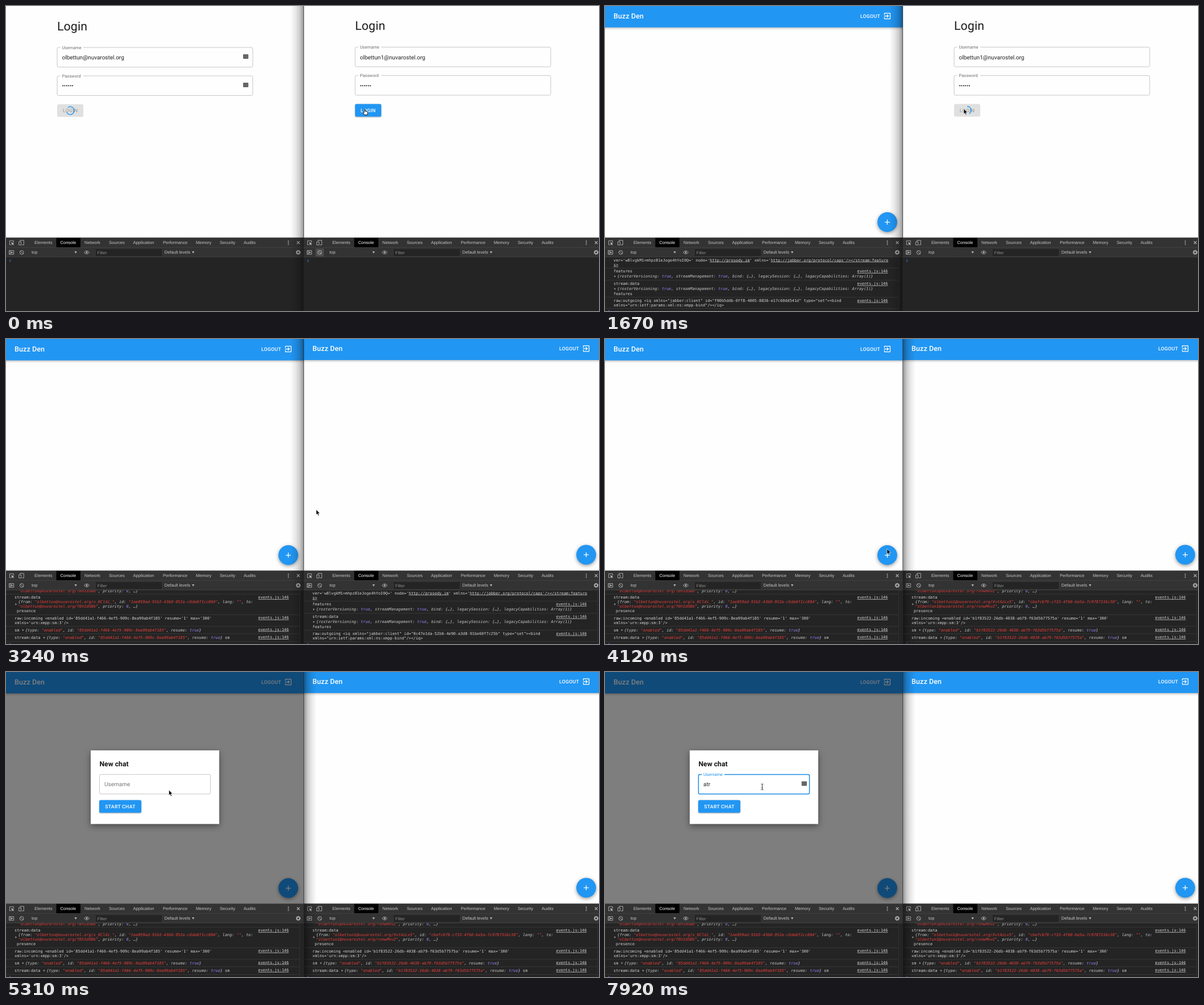
Animation of 1043x537 px, one loop 8 s. Source, as an HTML page:

```html
<!DOCTYPE html>
<html lang="en">
<head>
<meta charset="utf-8">
<title>Two chat clients</title>
<style>
html, body { margin: 0; width: 100%; height: 100%; overflow: hidden; background: #fefefe; }
svg { display: block; width: 1043px; height: 537px; text-rendering: geometricPrecision; }
text { white-space: pre; font-family: Roboto, sans-serif; }
.ui { font-family: "Liberation Sans", Arial, sans-serif; font-size: 7.55px; }
.mono { font-family: "DejaVu Sans Mono", monospace; font-size: 6.875px; fill: #d6d6d6; }
.obj { font-style: italic; fill: #c8c8c8; }
.str { fill: #e93f3b; }
.val { fill: #9980ff; }
.url { text-decoration: underline; }
.btn { font-size: 8.75px; font-weight: 500; letter-spacing: .02857em; }
.low { filter: drop-shadow(0 1px 1px rgba(0,0,0,.35)); }
.bar { filter: drop-shadow(0 1.5px 2px rgba(0,0,0,.35)); }
.fab { filter: drop-shadow(0 2px 3px rgba(0,0,0,.4)); }
.box { filter: drop-shadow(0 4px 6px rgba(0,0,0,.4)); }
.line { fill: none; stroke: #b4b4b4; stroke-width: .9; }
</style>
</head>
<body>
<svg id="stage" viewBox="0 0 1043 537" xmlns="http://www.w3.org/2000/svg"></svg>
<script>
const BLUE = '#2196f3', CHAR = 4.139, LOOP = 8000;
const HOST = 'nuvarostel.org';
const panes = [
  { id: 'L', dx: 0, dy: 0, user: 'olbettun@' + HOST, from: 'x_KCldi_', to: 'T0hId5Bb',
    msg: '1ee059ad-91b3-43b0-952a-c6da6f1cc804', sm: '85dd41a1-f466-4ef5-909c-8ea99ab4f185',
    bind: 'f90b5ddb-0ff8-4005-8836-e17c60dd541d' },
  { id: 'R', dx: 524, dy: -.6, user: 'olbettun1@' + HOST, from: 'XvtAzLx5', to: 'ronwMnvZ',
    msg: 'cbefc679-cf33-4fb0-be5a-7c9787316c38', sm: 'b1f83522-26db-4038-ab79-f63d5b77575a',
    bind: '0c47e1da-52b6-4e90-a3d8-91be60f7c25b' }
];

const esc = s => s.replace(/&/g, '&amp;').replace(/</g, '&lt;').replace(/>/g, '&gt;');
const text = (x, y, s, size, fill, more = '') =>
  `<text x="${x}" y="${y}" font-size="${size}" fill="${fill}" ${more}>${esc(s)}</text>`;
const rect = (x, y, w, h, fill, more = '') =>
  `<rect x="${x}" y="${y}" width="${w}" height="${h}" fill="${fill}" ${more}/>`;
const path = (d, more) => `<path d="${d}" ${more}/>`;
const group = (id, body, more = '') => `<g id="${id}" ${more}>${body}</g>`;
const button = (x, y, w, label, fill, ink, more = '') =>
  rect(x, y, w, 22.3, fill, `rx="2.5" ${more}`) +
  `<text class="btn" x="${x + w / 2}" y="${y + 14.2}" text-anchor="middle" fill="${ink}">${label}</text>`;
const badge = (x, y) => rect(x, y, 9.3, 8, '#666', 'rx="1"');

// Login form and chat page
function field(y, label, value, icon) {
  return rect(90, y, 344, 34.6, 'none', 'rx="2.5" stroke="#c0c0c0" stroke-width=".9"') +
    rect(95.5, y - 1, 40.5, 2, '#fefefe') +
    text(98.5, y + 2.7, label, 7.5, 'rgba(0,0,0,.56)') +
    text(98.5, y + 21.2, value, 10, 'rgba(0,0,0,.87)') +
    (icon ? badge(417, y + 12) : '');
}
function login(p) {
  const icon = p.id === 'L';
  return text(90, 42.5, 'Login', 21.25, 'rgba(0,0,0,.9)', 'letter-spacing=".15"') +
    field(73, 'Username', p.user, icon) + field(123, 'Password', '••••••', icon) +
    group('ready' + p.id, button(90, 173, 46, 'LOGIN', BLUE, '#fff', 'class="low"')) +
    group('busy' + p.id, button(90, 173, 46, 'LOGIN', '#e0e0e0', '#a6a6a6') +
      `<path id="arc${p.id}" fill="none" stroke="${BLUE}" stroke-width="1.4"/>`);
}
function home() {
  return rect(-6, -8, 536, 45.6, BLUE, 'class="bar"') +
    text(15, 22, 'Buzz Den', 12.5, '#fff', 'font-weight="500" letter-spacing=".09"') +
    '<text class="btn" x="449" y="20.6" fill="#fff">LOGOUT</text>' +
    path('M10.09 15.59L11.5 17l5-5-5-5-1.41 1.41L12.67 11H3v2h9.67zM19 3H5c-1.11 0-2 .9-2 2v4h2V5h14v14H5v-4H3v4c0 1.1.89 2 2 2h14c1.1 0 2-.9 2-2V5c0-1.1-.9-2-2-2z',
      'transform="translate(489 10) scale(.625)" fill="#fff"') +
    `<circle class="fab" cx="496.5" cy="380.5" r="17.4" fill="${BLUE}"/>` +
    path('M492.1 380.5h8.8M496.5 376.1v8.8', 'stroke="#fff" stroke-width="1.25"');
}
function modal() {
  const edge = (color, w) => rect(164.4, 180.4, 195.2, 34.4, 'none', `rx="2.5" stroke="${color}" stroke-width="${w}"`);
  return rect(149, 138, 226, 129.6, '#fff', 'class="box"') +
    text(164.5, 166, 'New chat', 12.2, 'rgba(0,0,0,.92)', 'font-weight="700"') +
    group('idle', edge('#c0c0c0', .9) + text(173, 201, 'Username', 10, 'rgba(0,0,0,.54)')) +
    group('focus', edge('#1e8ce3', 1.5) + rect(170.5, 179, 39.5, 3, '#fff') +
      text(173, 183, 'Username', 7.5, BLUE) + badge(345.8, 192.5) +
      text(173, 201, '', 10, 'rgba(0,0,0,.87)', 'id="typed"') + rect(0, 192, .8, 11.5, '#222', 'id="caret"')) +
    button(164, 225.4, 74, 'START CHAT', BLUE, '#fff', 'class="low"');
}

// Developer tools
function tools() {
  const ui = (x, y, s, fill = '#c4c4c4') => `<text class="ui" x="${x}" y="${y}" fill="${fill}">${s}</text>`;
  const tabs = { Elements: 50, Network: 138, Sources: 181, Application: 223.5, Performance: 276, Memory: 334, Security: 376, Audits: 418 };
  const down = (x, y) => path(`M${x} ${y}h4.4l-2.2 3.8z`, 'fill="#b4b4b4"');
  const dot = y => `<circle cx="496.6" cy="${y}" r=".9" fill="#bbb"/>`;
  return rect(0, 408, 524, 34, '#333') + rect(0, 442, 524, 95, '#242424') +
    rect(0, 407.6, 524, .7, '#4a4a4a') + rect(0, 424.7, 524, .7, '#484848') + rect(0, 441.6, 524, .7, '#484848') +
    rect(88.5, 408.2, 42.5, 16.5, '#000') + ui(95.5, 419.2, 'Console', '#fff') +
    Object.entries(tabs).map(([s, x]) => ui(x, 419.2, s)).join('') +
    path('M9 420.3H6.4V413.3H13.4V416', 'class="line"') + path('M9.4 415.8l5 2-2.1.9 1.7 1.8-.8.8-1.8-1.8-1 2z', 'fill="#b4b4b4"') +
    path('M24.8 414.5V412.6H31.3V420.6H28M22.6 415.2h4v5.6h-4z', 'class="line"') +
    dot(414) + dot(416.8) + dot(419.6) +
    path('M511.7 414.2l4.8 4.8m0-4.8l-4.8 4.8', 'class="line" style="stroke-width:1.1"') +
    path('M5.6 430.6h8v6.6h-8zM7.6 430.6v6.6', 'class="line"') + path('M9 432l3.6 1.9-3.6 1.9z', 'fill="#b4b4b4"') +
    path('M24.3 433.9a3.4 3.4 0 1 0 6.8 0a3.4 3.4 0 1 0 -6.8 0M25.4 431.5l4.7 4.8', 'class="line"') +
    ui(45, 436.4, 'top') + down(120.4, 432) +
    path('M137.4 433.8q4.6-5.4 9.2 0q-4.6 5.4-9.2 0z', 'class="line"') + '<circle cx="142" cy="433.8" r="1.5" fill="#b4b4b4"/>' +
    rect(158, 428, 116, 12, '#242424') + ui(160.8, 436.6, 'Filter', '#8c8c8c') +
    ui(278.7, 436.4, 'Default levels') + down(327, 432) +
    '<circle cx="514" cy="433.8" r="2.5" fill="none" stroke="#b4b4b4" stroke-width="1.6"/>' +
    '<circle cx="514" cy="433.8" r="3.7" fill="none" stroke="#b4b4b4" stroke-width="1.1" stroke-dasharray="1.45"/>';
}
const plain = s => esc(s).replace(/\[\[(.*?)\]\]/g, '<tspan class="url">$1</tspan>');
const tint = s => '<tspan class="obj">' + esc(s)
  .replace(/"[^"]*"/g, m => `<i>${m}</i>`)
  .replace(/\b(true|0)\b(?![^<]*<\/i>)/g, '<tspan class="val">$1</tspan>')
  .replace(/<i>/g, '<tspan class="str">').replace(/<\/i>/g, '</tspan>') + '</tspan>';

// "▶" opens an object, "▷" one on two lines, "·" continues it
function row(y, s, x = 15) {
  const write = (x, body) => `<text class="mono" x="${x}" y="${y + 2.3}">${body}</text>`;
  const m = s.match(/^(.*?)([▶▷·])(.*)$/);
  if (!m) return write(x, plain(s));
  const at = x + m[1].length * CHAR, end = m[3].lastIndexOf('}') + 1 || m[3].length;
  const mid = y + (m[2] === '▷' ? 4 : 0);
  return write(x, plain(m[1])) + write(at + 6.5, tint(m[3].slice(0, end)) + plain(m[3].slice(end))) +
    (m[2] === '·' ? '' : path(`M${at + 1.4} ${mid - 1.8}l2.8 1.8-2.8 1.8z`, 'fill="#9a9a9a"'));
}
const rows = list => list.map(r => row(...r)).join('');
const links = list => list.map(y => row(y, '[[events.js:146]]', 443.6)).join('');
const rules = list => list.map(y => rect(0, y, 516, .7, '#3d3d3d')).join('');
const prompt = y => path(`M6 ${y}l2.4 2-2.4 2`, 'fill="none" stroke="#3f86f0" stroke-width="1"');

function logs(p) {
  const features = '▶{rosterVersioning: true, streamManagement: true, bind: {…}, legacySession: {…}, legacyCapabilities: Array(1)}';
  const enabled = `▶{type: "enabled", id: "${p.sm}", resume: true}`;
  const target = `·"${p.user}/${p.to}", priority: 0, …}`;
  const tail = prompt(535.4) + rect(516, 442, .7, 95, '#383838');
  return [
    prompt(446.6),
    rows([
      [450, 'stream:data ▶{type: "challenge", value: Uint8Array(160)} sasl'],
      [462, 'credentials:update'],
      [470.5, '▷{password: "123456", clientKey: Uint8Array(20), salt: Uint8Array(36), saltedPassword: Uint8Array(20), serverKey: Uin'],
      [478.5, '·t8Array(20)}'],
      [490.5, 'raw:outgoing <response xmlns="urn:ietf:params:xml:ns:xmpp-'],
      [498.5, 'sasl">YzIiaXdzLHI9YmQyZTRkYjVhY2I1MTBhODY4ZGI2NjhjNzQzMTk0MWE3YzhhZWQ2NzE1ZDBhNzc0OTUyZDJlYjE2YjllY2I5ZmU3NGIzLTQ'],
      [506.5, 'yNGMtNDAwNS04NWU3LWQxOWQ1ZjAxNWZmZSxwPVZ6a0J6b3lRVlhUOS9PaVZiUVhERkpYRUhiYz0=</response>'],
      [518.5, "raw:incoming <success xmlns='urn:ietf:params:xml:ns:xmpp-"],
      [526.5, "sasl'>dj1ObStJZ0pjY3Q4dkhHQ0pVdU9oTUZIVnBRMVE9</success>"]
    ]) + links([449.5, 462, 490.5, 518.5]) + rules([456, 484.3, 512.3, 532.3]) + tail,
    rows([
      [447.2, "ver='w8lvgkM1+mhpz81eJoge4hYoI0Q=' node='[[http://prosody.im]]' xmlns='[[http://jabber.org/protocol/caps'/></stream:feature]]"],
      [455.3, '[[s>]]'],
      [467, 'features'], [476, features],
      [489, 'stream:data'], [498, features], [507, 'features'],
      [518.5, `raw:outgoing <iq xmlns="jabber:client" id="${p.bind}" type="set"><bind`],
      [526.5, 'xmlns="urn:ietf:params:xml:ns:xmpp-bind"/></iq>']
    ]) + links([467, 489, 518.5]) + rules([461, 482.6, 512.5, 532.3]) + tail,
    rows([
      [443.2, target],
      [455, 'stream:data'],
      [463, `▷{from: "${p.user}/${p.from}", id: "${p.msg}", lang: "", to:`],
      [471, target],
      [479, 'presence', 19.1],
      [491.5, `raw:incoming <enabled id='${p.sm}' resume='1' max='300'`],
      [499.5, "xmlns='urn:xmpp:sm:3'/>"],
      [512.5, 'sm ' + enabled],
      [525.8, 'stream:data ' + enabled + ' sm']
    ]) + links([455, 491, 511.3, 525]) + rules([448.8, 485.3, 505.5, 518.6, 532]) + tail
  ].map((s, i) => group('log' + p.id + i, s)).join('');
}

const fade = (id, x1, x2) => `<linearGradient id="${id}" gradientUnits="userSpaceOnUse" x1="${x1}" x2="${x2}">` +
  [[0, .42], [.3, .2], [.6, .09], [1, 0]].map(([o, a]) => `<stop offset="${o}" stop-opacity="${a}"/>`).join('') + '</linearGradient>';

const stage = document.getElementById('stage');
stage.innerHTML = '<defs>' + fade('toLeft', 524, 500) + fade('toRight', 524, 546) +
  '<clipPath id="page"><path d="M0-2h524v412H0z"/></clipPath><clipPath id="console"><path d="M0 442.3h524V537H0z"/></clipPath></defs>' +
  rect(0, 0, 1043, 537, '#fefefe') +
  panes.map(p => `<g transform="translate(${p.dx} ${p.dy})" clip-path="url(#page)">` +
    group('login' + p.id, login(p)) + group('home' + p.id, home()) + '</g>').join('') +
  rect(0, 0, 524, 408, '#000', 'id="veil"') + group('modal', modal()) +
  panes.map(p => `<g transform="translate(${p.dx} 0)">` + tools() +
    `<g clip-path="url(#console)">${logs(p)}</g></g>`).join('') +
  rect(544.5, 427, 14.5, 14, 'rgba(255,255,255,.12)', 'id="hover"') +
  rect(500, 0, 24, 537, 'url(#toLeft)', 'id="shadeL"') + rect(524, 0, 22, 537, 'url(#toRight)', 'id="shadeR"') +
  rect(523.2, 0, 1, 537, 'rgba(40,40,40,.75)') +
  group('hand', path('M2.6 10.8L0 6.6Q.4 5.2 2 6.4V1Q2.8-.3 3.6 1V4.2L7.4 5Q8.6 5.4 8.2 8L7.3 10.8Z', 'fill="#fff" stroke="#000" stroke-width=".9"')) +
  group('arrow', path('M0 0V9.4L2.1 7.4L3.6 11L5.2 10.3L3.7 6.8H6.6Z', 'fill="#000" stroke="#fff" stroke-width=".7"')) +
  group('beam', path('M-2-5.2Q0-5.2 0-4V4Q0 5.2-2 5.2M2-5.2Q0-5.2 0-4M0 4Q0 5.2 2 5.2M-1 1.6h2', 'fill="none" stroke="#222" stroke-width=".9"'));

const $ = Object.fromEntries([...stage.querySelectorAll('[id]')].map(e => [e.id, e]));
const show = (id, on) => { $[id].style.display = on ? '' : 'none'; };

// Moments at which the screen refreshes
const ticks = [0, 320, 520, 730, 930, 1130, 1340, 1490, 1670, 1840, 2040, 2240, 2440, 2640, 2820, 3010, 3200, 3400, 3590,
  3770, 4120, 4300, 4470, 4630, 4790, 4950, 5130, 5310, 5480, 5640, 5810, 5990, 6140, 6290, 6580, 6880, 7030, 7170, 7620, 7770, 7920];
const mouse = [[0, 631, 181], [2640, 631, 181], [3590, 496, 369.5], [4470, 496, 369.5], [4950, 317.5, 225], [5480, 276.5, 202.3]];
const typing = [[0, 0], [5810, 1], [5990, 2], [6140, 3], [6290, 4], [6580, 5], [7620, 4], [7770, 3]];
const steps = { L: [0, 930, 1340, 2240], R: [0, 2440, 3200, 3770] };
const opens = { L: 1130, R: 3010 };

const last = (list, t) => list.filter(k => k[0] <= t).pop();
function track(t) {
  const a = last(mouse, t), b = mouse[mouse.indexOf(a) + 1];
  if (!b) return a.slice(1);
  const u = (t - a[0]) / (b[0] - a[0]), e = u * u * (3 - 2 * u);
  return [a[1] + (b[1] - a[1]) * e, a[2] + (b[2] - a[2]) * e];
}
function arc(t, turn) {
  const k = t - 1670, rad = Math.PI / 180, r = 6.9;
  const len = 165 + 125 * Math.cos((k / 1400 * 360 - 97) * rad), from = -90 + 652 * k / 970 + turn;
  const at = a => `${113 + r * Math.cos(a * rad)} ${184.2 + r * Math.sin(a * rad)}`;
  return `M${at(from)}A${r} ${r} 0 ${+(len > 180)} 1 ${at(from + len)}`;
}

function draw(t) {
  for (const { id } of panes) {
    const open = t >= opens[id], busy = id === 'L' || t >= 320;
    show('login' + id, !open);
    show('home' + id, open);
    show('ready' + id, !busy);
    show('busy' + id, busy);
    const now = steps[id].filter(s => s <= t).length - 1;
    for (let i = 0; i < 4; i++) show('log' + id + i, i === now);
  }
  $.arcL.setAttribute('d', arc(t + 1985, 110));
  $.arcR.setAttribute('d', arc(t, 0));

  show('hover', t < 320);
  show('shadeL', t < 4120);
  show('shadeR', t >= 4120);
  $.veil.setAttribute('opacity', t < 4790 ? 0 : Math.min(.5, .16 + (t - 4790) / 160 * .175));
  show('modal', t >= 4790);

  const focus = t >= 5480, n = last(typing, t)[1];
  show('idle', !focus);
  show('focus', focus);
  $.typed.textContent = 'atrel'.slice(0, n);
  $.caret.setAttribute('x', 173.2 + (n && focus ? $.typed.getComputedTextLength() : 0));
  show('caret', !(t >= 6880 && t < 7170) && t < 7920);

  const [x, y] = track(t), kind = t < 320 ? 'hand' : t < 5480 ? 'arrow' : 'beam';
  for (const id of ['hand', 'arrow', 'beam']) show(id, id === kind);
  $[kind].setAttribute('transform', `translate(${kind === 'hand' ? x - 3 : x} ${y})`);
}

const start = performance.now();
let shown = -1;
function frame() {
  const t = (performance.now() - start) % LOOP, tick = ticks.filter(k => k <= t).pop();
  if (tick !== shown) draw(shown = tick);
  requestAnimationFrame(frame);
}
frame();
</script>
</body>
</html>
```
